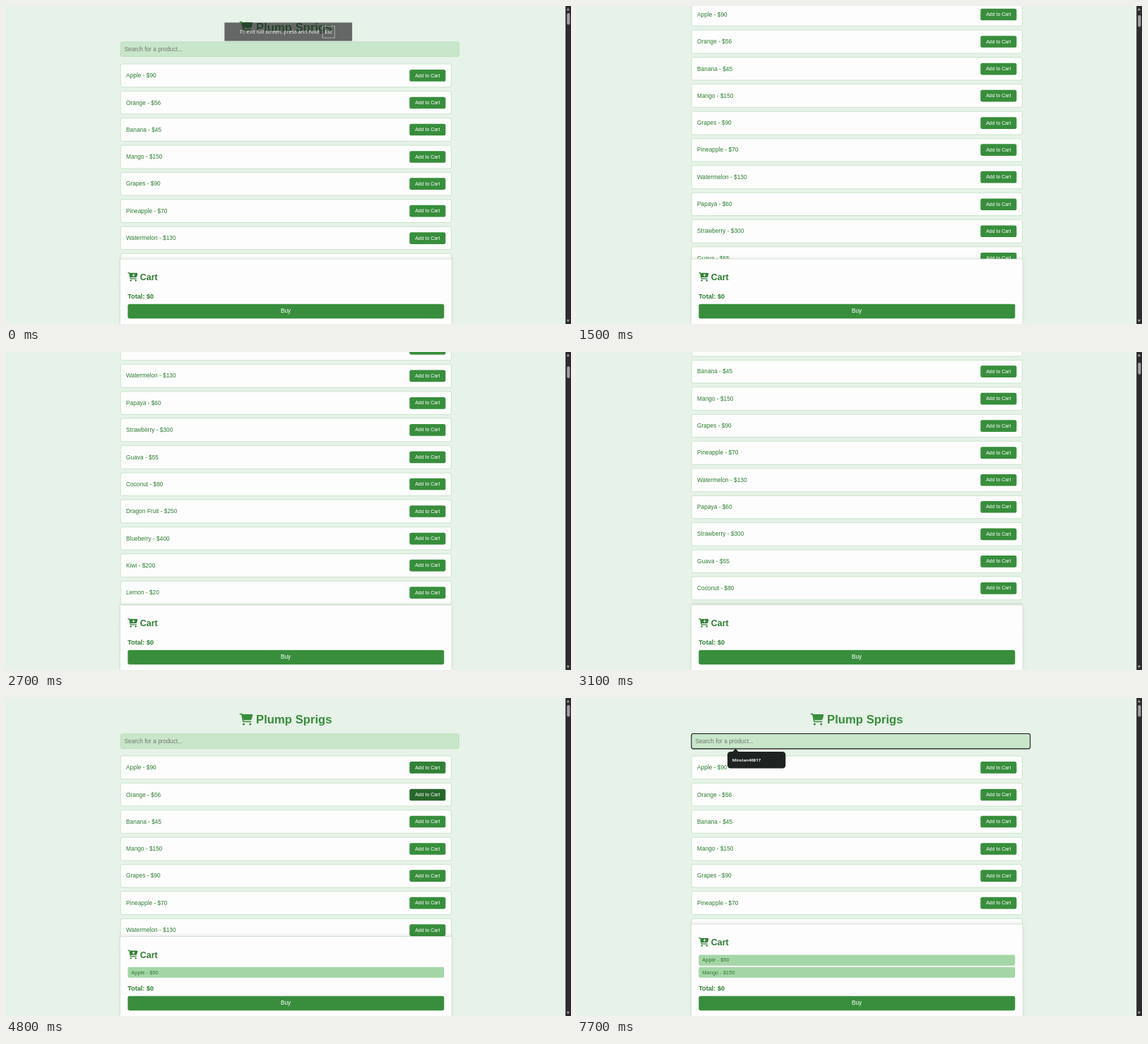
Recreate the animation shown at these times as an HTML page. Size 800 px wide and 450 px high, loop 8 s.

```html
<!DOCTYPE html>
<html lang="en">
<head>
<meta charset="utf-8">
<title>Shop</title>
<style>
  html, body { margin: 0; width: 100%; height: 100%; overflow: hidden; background: #e7f2e8; }
  /* The page is laid out at 1536 x 864 and scaled to the 800 x 450 stage. */
  #stage { position: absolute; width: 1536px; height: 864px; overflow: hidden; background: #e7f2e8;
    transform: scale(.520833); transform-origin: 0 0;
    font: 16px "Liberation Sans", Arial, sans-serif; color: #2e7d32; }
  #stage * { box-sizing: border-box; }
  #stage > *, #page > * { position: absolute; }
  #page { left: 310.5px; top: 0; width: 900px; }
  h1, h2 { margin: 0; white-space: pre; line-height: normal; }
  h1 { top: 41px; width: 900px; text-align: center; font-size: 32px; color: #388e3c; }
  h2 { position: absolute; left: 20px; top: 35px; font-size: 24px; }
  svg { height: 1em; width: 1.125em; vertical-align: -.125em; overflow: visible; }
  #search { top: 97px; width: 921.6px; height: 40.5px; padding: 0 10px; line-height: 39px;
    border: .8px solid #a5d6a7; border-radius: 5px; background: #c8e6c9; color: #757575; }
  #search.focus { outline: 2.4px solid #141414; outline-offset: -1px; }
  #list { top: 157.2px; width: 900px; }
  .row { display: flex; justify-content: space-between; align-items: center; height: 63.6px;
    margin-bottom: 10px; padding: 0 15px; border: .8px solid #a5d6a7; border-radius: 5px; background: #fdfdfd; }
  .button { height: 32px; padding: 0 15px; border-radius: 5px; background: #388e3c; color: #fff;
    font-size: 13.333px; line-height: 32px; }
  #cart { left: 310.5px; width: 900px; bottom: 0; background: #fdfdfd; border-top: 1px solid #b9d3ba;
    box-shadow: 0 -2px 10px rgba(0, 0, 0, .1); }
  #items { position: absolute; left: 20px; right: 20px; bottom: 99px; }
  .item { height: 28.8px; margin-bottom: 4.8px; padding: 0 10px; border-radius: 4px;
    background: #a5d6a7; font-size: 14.4px; line-height: 28.8px; }
  #total { position: absolute; left: 20px; bottom: 64px; font-size: 17.6px; font-weight: bold; }
  #buy { position: absolute; left: 20px; right: 20px; bottom: 15.4px; height: 38.4px; border-radius: 5px;
    background: #388e3c; color: #fff; text-align: center; line-height: 38.4px; }
  #bar { right: 0; top: 0; width: 15px; height: 864px; background: #2c2c2c; }
  #bar * { position: absolute; }
  #thumb { left: 3.5px; width: 8.5px; height: 32px; border-radius: 5px; background: #9f9f9f; }
  .arrow { left: 3px; border: 4.5px solid transparent; }
  #banner { left: 594px; top: 44.5px; width: 347px; height: 50.5px; background: rgba(32, 33, 36, .66);
    color: #fff; font: 14px "Open Sans", "Noto Sans", sans-serif; line-height: 50px; white-space: nowrap; }
  #banner span { position: absolute; left: 41px; }
  #banner b { position: absolute; left: 266px; top: 9px; width: 34px; height: 33px; border: 1.6px solid #e4e7e4;
    font-weight: normal; line-height: 30px; text-align: center; }
  #tip { left: 409px; top: 146px; width: 157.5px; height: 45px; padding-left: 13px; border-radius: 8px;
    background: #1e2221; color: #f4f4f4; font: bold 11.5px "Open Sans", "Noto Sans", sans-serif; line-height: 45px; }
  #tip::before { content: ""; position: absolute; left: 14px; top: -8px;
    border: solid transparent; border-width: 0 8px 8px; border-bottom-color: #1e2221; }
</style>
</head>
<body>
<div id="stage">
  <div id="page">
    <h1><svg viewBox="0 0 576 512"><g id="trolley" fill="currentColor">
      <path d="M24 24H70Q96 24 101 50L153 330Q158 360 190 360H488" fill="none" stroke="currentColor" stroke-width="48" stroke-linecap="round"/>
      <path d="M110 32H531Q577 38 570 82L529 235Q512 288 460 288H160Z"/>
      <circle cx="176" cy="464" r="48"/><circle cx="464" cy="464" r="48"/>
    </g></svg> Plump Sprigs</h1>
    <div id="search">Search for a product...</div>
    <div id="list"></div>
  </div>
  <div id="cart">
    <h2><svg viewBox="0 0 576 512"><use href="#trolley"/>
      <path d="M272 160H400M336 96V224" stroke="#fdfdfd" stroke-width="40" stroke-linecap="round"/></svg> Cart</h2>
    <div id="items"></div>
    <div id="total">Total: $0</div>
    <div id="buy">Buy</div>
  </div>
  <div id="bar">
    <div class="arrow" style="top:1px;border-bottom:7px solid #a0a0a0"></div>
    <div id="thumb"></div>
    <div class="arrow" style="bottom:1px;border-top:7px solid #a0a0a0"></div>
  </div>
  <div id="tip">Mirolan40817</div>
  <div id="banner"><span>To exit full screen, press and hold</span><b>Esc</b></div>
</div>
<script>
const LOOP = 8000, STEP = 100;
const $ = id => document.getElementById(id);
const clamp = x => Math.min(1, Math.max(0, x));
const ramp = (t, start, end) => clamp((t - start) / (end - start));

const products = ["Apple - $90", "Orange - $56", "Banana - $45", "Mango - $150", "Grapes - $90",
  "Pineapple - $70", "Watermelon - $130", "Papaya - $60", "Strawberry - $300", "Guava - $55",
  "Coconut - $80", "Dragon Fruit - $250", "Blueberry - $400", "Kiwi - $200", "Lemon - $20",
  "Peach - $120", "Cherry - $350", "Lychee - $180", "Plum - $110"];
$("list").innerHTML = products.map(name =>
  `<div class="row"><span>${name}</span><div class="button">Add to Cart</div></div>`).join("");
const buttons = [...document.querySelectorAll(".button")];

// [time, scroll offset]
const scrollKeys = [[1100, 0], [1500, 165.6], [2100, 565.6], [2400, 710], [2700, 565.6], [3500, 0]];
// [button, pointer enters, pointer leaves, fade time]
const hovers = [[0, 3800, 4600, 300], [1, 4600, 5400, 200], [2, 5400, 5800, 300], [3, 5800, 6200, 300]];
// [product, time of the click]
const clicks = [[0, 4500], [3, 6100]];
const cartHeights = [177, 216, 249.6];
let shownCount = -1;

function scrollAt(t) {
  for (let i = 1; i < scrollKeys.length; i++) {
    const [t0, y0] = scrollKeys[i - 1], [t1, y1] = scrollKeys[i];
    if (t <= t1) return y0 + (y1 - y0) * ramp(t, t0, t1);
  }
  return 0;
}

function showCart(count) {
  if (count === shownCount) return;
  shownCount = count;
  $("cart").style.height = cartHeights[count] + "px";
  $("items").innerHTML = clicks.slice(0, count)
    .map(([product]) => `<div class="item">${products[product]}</div>`).join("");
}

function draw(now) {
  const t = Math.floor(now % LOOP / STEP) * STEP;
  const scroll = scrollAt(t);
  $("page").style.top = -scroll + "px";
  $("thumb").style.top = 19 + scroll * .035 + "px";
  $("banner").style.opacity = 1 - ramp(t, 0, 800);
  for (const [index, enter, leave, fade] of hovers) {
    const dark = ramp(t, enter, enter + fade) - ramp(t, leave, leave + fade);
    buttons[index].style.background = `color-mix(in srgb, #27672b ${dark * 100}%, #388e3c)`;
  }
  showCart(clicks.filter(([, time]) => t >= time).length);
  $("search").classList.toggle("focus", t >= 7200);
  $("tip").style.opacity = ramp(t, 7500, 7700);
}

let start;
function frame(now) {
  start ??= now;
  draw(now - start);
  requestAnimationFrame(frame);
}
draw(0);
requestAnimationFrame(frame);
</script>
</body>
</html>
```
